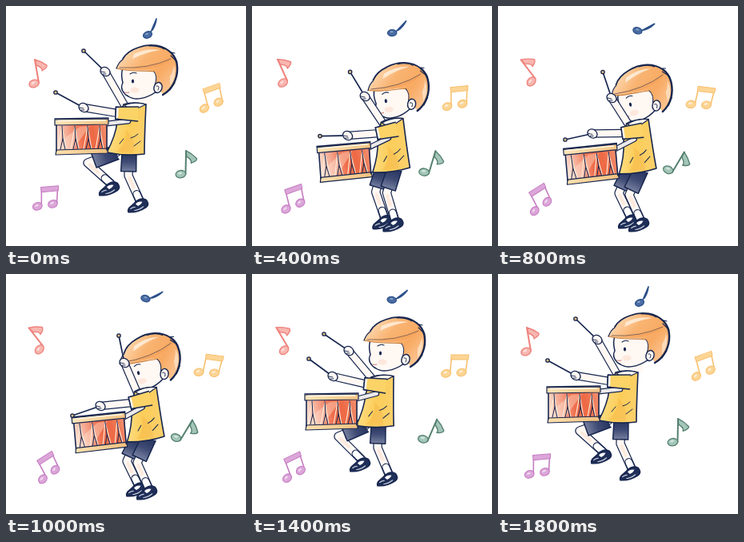
Animation of 300x300 px, one loop 2 s. Source, as an HTML page with a canvas:

```html
<!DOCTYPE html>
<html lang="en">
<head>
<meta charset="utf-8">
<title>Little drummer</title>
<style>
html, body { margin: 0; width: 100%; height: 100%; overflow: hidden; background: #fff; }
canvas { display: block; width: 300px; height: 300px; }
</style>
</head>
<body>
<canvas id="stage"></canvas>
<script>
const canvas = document.getElementById('stage');
const ctx = canvas.getContext('2d');
const dpr = window.devicePixelRatio || 1;
canvas.width = canvas.height = 300 * dpr;

const STEP = 200, LOOP = 2000;
const INK = '#17264f', SKIN = '#fff8f3';

// head, neck and drum: x, y, tilt in degrees; sticks: tip, hand; legs: knee, ankle
const stride = {
  head: [190, 102, 0], neck: [168, 122, 0], drum: [61, 140, 0],
  farStick: [97, 56, 124, 82], nearStick: [62, 108, 97, 127],
  farLeg: [102, 196, 131, 222], nearLeg: [153, 212, 167, 243]
};
const stand = {
  head: [202, 121, 0], neck: [183, 139, -8], drum: [81, 171, -3],
  farStick: [125, 74, 149, 104], nearStick: [85, 171, 122, 174],
  farLeg: [160, 230, 166, 265], nearLeg: [175, 230, 179, 267]
};
const crouch = {
  head: [198, 124, -12], neck: [181, 142, -11], drum: [81, 177, -5],
  farStick: [121, 88, 136, 119], nearStick: [85, 157, 118, 154],
  farLeg: [151, 234, 165, 263], nearLeg: [164, 236, 178, 267]
};
const strike = {
  ...crouch, head: [198, 125, -12], drum: [82, 178, -5],
  farStick: [141, 77, 148, 111], nearStick: [83, 177, 118, 165]
};
const lift = {
  head: [197, 122, -5], neck: [180, 140, -5], drum: [77, 164, 0],
  farStick: [97, 97, 118, 122], nearStick: [82, 119, 121, 129],
  farLeg: [126, 219, 154, 248], nearLeg: [168, 230, 180, 265]
};
const step = {
  head: [192, 107, 0], neck: [170, 127, -2], drum: [66, 149, 0],
  farStick: [90, 75, 121, 96], nearStick: [71, 106, 101, 128],
  farLeg: [108, 203, 137, 232], nearLeg: [157, 217, 171, 250]
};

function mix(a, b, k) {
  const pose = {};
  for (const key in a) pose[key] = a[key].map((v, i) => v + (b[key][i] - v) * k);
  return pose;
}
const poses = [stride, stand, mix(stand, crouch, .6), crouch, mix(crouch, strike, .5),
  strike, lift, step, mix(step, stride, .65), stride];
const sway = [0, .14, .52, .88, .98, 1, .93, .74, .28, 0];

function shape(d, fill, width, ink = INK) {
  const p = new Path2D(d);
  if (fill) { ctx.fillStyle = fill; ctx.fill(p); }
  if (width) { ctx.strokeStyle = ink; ctx.lineWidth = width; ctx.stroke(p); }
}

function oval(x, y, rx, ry, tilt, fill, width, ink = INK) {
  ctx.beginPath();
  ctx.ellipse(x, y, rx, ry, tilt * Math.PI / 180, 0, 7);
  if (fill) { ctx.fillStyle = fill; ctx.fill(); }
  if (width) { ctx.strokeStyle = ink; ctx.lineWidth = width; ctx.stroke(); }
}

function blend(x0, y0, x1, y1, ...colors) {
  const g = ctx.createLinearGradient(x0, y0, x1, y1);
  colors.forEach((c, i) => g.addColorStop(i / (colors.length - 1), c));
  return g;
}

function placed([x, y, tilt], [px, py], draw) {
  ctx.save();
  ctx.translate(x, y);
  ctx.rotate(tilt * Math.PI / 180);
  ctx.translate(-px, -py);
  draw();
  ctx.restore();
}

function line(points, width, color = INK) {
  ctx.beginPath();
  points.forEach(p => ctx.lineTo(p[0], p[1]));
  ctx.lineWidth = width;
  ctx.strokeStyle = color;
  ctx.stroke();
}

function limb(points, width, color) {
  line(points, width + 2.4);
  line(points, width, color);
}

const along = (a, b, k) => [a[0] + (b[0] - a[0]) * k, a[1] + (b[1] - a[1]) * k];

// The two ends of a cut of half-width r across the line a-b, at b.
function across(a, b, r) {
  const angle = Math.atan2(b[1] - a[1], b[0] - a[0]);
  const dx = -Math.sin(angle) * r, dy = Math.cos(angle) * r;
  return [[b[0] - dx, b[1] - dy], [b[0] + dx, b[1] + dy]];
}

// Cloth tube from a to b, open at a.
function tube(a, b, ra, rb, fill) {
  const [a1, a2] = across(b, a, ra), [b1, b2] = across(a, b, rb);
  const edge = [a2, b1, b2, a1];
  ctx.fillStyle = fill;
  ctx.beginPath();
  edge.forEach(p => ctx.lineTo(p[0], p[1]));
  ctx.fill();
  line(edge, 1.5);
}

function onTorso([x, y, tilt], dx, dy) {
  const a = tilt * Math.PI / 180, c = Math.cos(a), s = Math.sin(a);
  return [x + dx * c - dy * s, y + dx * s + dy * c];
}

function stick([tx, ty, hx, hy]) {
  line([[tx, ty], along([tx, ty], [hx, hy], 1.1)], 1.7);
  oval(tx, ty, 2.2, 2.2, 0, '#e3bd7e', 1.3);
}

function hand(x, y) {
  oval(x, y, 6.4, 5.2, 35, SKIN, 1.4);
  line([[x - 5, y], [x, y + 1]], .9);
  line([[x - 3, y + 3], [x + 1, y + 3]], .9);
}

function leg(hip, [kx, ky, ax, ay], cut) {
  const knee = [kx, ky], ankle = [ax, ay];
  limb([hip, knee, ankle], 9, SKIN);
  line([along(knee, ankle, .1), along(knee, ankle, .45)], 4, 'rgba(250,190,160,.25)');
  limb([along(knee, ankle, .75), ankle], 8, '#fff');
  placed([ax - 2, ay + 7, -20], [0, 0], () => {
    shape('M-14 3 C-14 -3 -5 -3 -1 -6 Q7 -9 12 -4 Q15 3 9 5 Q-4 8 -14 3Z', '#1f2f58', 1.6);
    shape('M-2 -3 Q2 -6 7 -3 Q4 0 0 0Z', '#fff');
    shape('M-10 0 Q-6 -1 -4 0 M-6 4 Q1 5 6 3', null, 1.1, '#c9cedc');
  });
  const end = along(hip, knee, cut);
  tube(hip, end, 9, 9.5, blend(hip[0], hip[1], end[0], end[1], '#27345f', '#3f4b74', '#767f9f'));
}

function head() {
  shape('M160 108 L164 124 L180 123 L184 108Z', SKIN);
  shape('M146 78 C143 86 145 91 146 96 C142 103 147 110 153 113 C160 118 174 117 188 107 L193 75Z', SKIN, 1.5);
  oval(161, 105, 5.5, 3.5, 0, 'rgba(250,185,160,.28)');
  oval(158.5, 94, 1.6, 2.5, 0, INK);
  shape('M155 85 Q159 82 163 84', null, 1.1);
  shape('M149 108 Q152 109 154 108', null, .9, '#c76d60');

  shape('M138 78 C143 69 149 59 161 54 C177 46 197 49 207 59 C217 69 215 86 210 96 Q204 107 196 110 L187 99 C186 92 190 88 185 82 C174 78 157 83 138 78Z',
    blend(150, 55, 205, 105, '#fdd8b0', '#f9b472', '#f8aa63', '#fcc694'));
  shape('M144 77 Q178 80 207 66 Q188 84 144 77Z', 'rgba(240,140,65,.28)');
  shape('M160 60 Q176 52 193 55 Q174 58 158 66Z', 'rgba(255,246,232,.75)');
  shape('M205 88 Q209 82 210 74 Q214 88 205 100Z', 'rgba(255,240,222,.6)');
  shape('M138 78 C156 83 174 80 185 82', null, 1.1, '#c9803f');
  shape('M146 67 Q141 70 138 78', null, 1.2);
  shape('M142 77 Q178 79 206 66', null, .8, '#6b5550');
  shape('M146 66 C150 59 156 55 165 52 C181 46 197 49 207 59', null, 1.8);
  shape('M207 59 C217 69 215 86 210 96 Q205 106 196 111', null, 2.4);
  shape('M179 50 Q190 49 198 54 M206 62 L214 70 M207 58 L211 59 M205 105 L211 96', null, 1.1);
  shape('M185 82 Q190 88 186 99', null, 1);

  oval(190, 102, 5, 6.6, 18, SKIN, 1.4);
  shape('M188 100 Q193 99 190 105', null, .9);
}

function shirt() {
  shape('M147 123 Q159 119 175 123 C174 145 173 166 173 185 Q150 188 126 183 Q137 162 139 145Z',
    blend(130, 150, 173, 160, '#fce08c', '#fccd59', '#fbd069'), 1.6);
  shape('M150 155 Q163 166 159 184 L138 182 Q151 172 150 155Z', 'rgba(238,165,60,.25)');
  shape('M148 124 Q155 131 164 128 L175 123 Q160 119 148 124Z', '#fffaf0', 1.2);
  shape('M165 160 Q161 164 156 165 M168 169 L160 175 M147 166 L142 172', null, 1);
}

function drum() {
  shape('M2 6 L66 7 L65 40 L3 41Z', blend(4, 30, 64, 18, '#fbdccd', '#f5a48c', '#ef6f4d', '#ee6a46', '#f18a68'));
  shape('M5 38 L14 24 L31 11 L44 10 L23 39Z', 'rgba(255,232,215,.4)');
  for (const x of [9, 25, 41, 56]) {
    shape(`M${x} 11 L${x - 5} 39 M${x} 11 L${x + 5} 39`, null, 1.1, '#fdeedd');
    shape(`M${x} 10 L${x + 1} 26 L${x + 4} 39 M${x + 1} 26 L${x - 2} 39`, null, 1);
  }
  shape('M0 2 L67 1 L67 8 L0 9Z', blend(0, 0, 67, 0, '#fce4b8', '#f5c585'), 1.2);
  shape('M2 40 L66 38 L66 44 L1 46Z', blend(0, 0, 67, 0, '#fce1b0', '#f2c07d'), 1.2);
  shape('M0 1 L67 0 M2 9 L2 41 M65 9 L65 40', null, 1.6);
  shape('M4 3.5 L63 3', null, 1.3, '#fff8ea');
}

function boy(p) {
  const neck = p.neck;
  const shoulder = onTorso(neck, -3, 13);
  const farHand = p.farStick.slice(2), nearHand = p.nearStick.slice(2);

  leg(onTorso(neck, -30, 61), p.farLeg, .78);
  leg(onTorso(neck, -14, 61), p.nearLeg, .82);
  placed(p.head, [190, 102], head);

  stick(p.farStick);
  limb([onTorso(neck, -17, 7), farHand], 8, SKIN);
  hand(...farHand);
  placed(neck, [168, 122], shirt);

  limb([onTorso(neck, -15, 22), onTorso(p.drum, 65, 7)], 4.5, '#eceaea');
  placed(p.drum, [0, 0], drum);

  const cuff = along(shoulder, nearHand, .41);
  cuff[1] += 2;
  stick(p.nearStick);
  limb([cuff, nearHand], 8, SKIN);
  tube(shoulder, cuff, 9, 7.5, '#fcd367');
  tube(along(cuff, shoulder, .12), cuff, 7.5, 7.5, '#fffaf0');
  hand(...nearHand);
}

function single(color, pale) {
  shape('M5 13 L0 -16', null, 2, color);
  shape('M0 -16 Q8 -14 15 -9 Q16 -6 9 -2 Q10 -6 2 -9Z', pale, 1.4, color);
  oval(-1, 14, 6.3, 4.6, -20, pale, 1.3, color);
  oval(-2, 13, 2.5, 1.3, -25, 'rgba(255,255,255,.55)');
}

function pair(color, pale) {
  shape('M-5 13 L-6 -9 M14 8 L14 -12', null, 1.6, color);
  shape('M-7 -11 L15 -14 L15 -8 L-6 -5Z', pale, 1, color);
  for (const [x, y] of [[-10, 13], [9, 9]]) {
    oval(x, y, 6, 4.7, -22, pale, 1.1, color);
    oval(x - 1, y - 1, 2.5, 1.3, -25, 'rgba(255,255,255,.55)');
  }
}

function notes(s) {
  placed([37, 83 - 2 * s, -28 * s], [1, 0], () => single('#ee827c', '#f8b6b0'));
  placed([224, 197 - s, 11 + 30 * s], [2, 0], () => single('#55806f', '#a3c6b9'));
  placed([256 - s, 113, -12 + 27 * s], [1, 0], () => pair('#f8c070', '#fcd595'));
  placed([51 - s, 237 + 2 * s, 3 - 28 * s], [1, -1], () => pair('#c57dc2', '#dca6d9'));
  placed([182 + 2 * s, 27, 40 * s], [0, 0], () => {
    shape('M-2 8 L6 -11 Q5 -3 1 3', '#3c5f96', 1.7, '#2b4f88');
    oval(-5, 9, 5.7, 4, -22, '#4a6ca3', 1.2, '#2b4f88');
    oval(-6, 8, 2, 1, -25, '#8aa4c7');
  });
}

const start = performance.now();
function render() {
  const k = Math.floor((performance.now() - start) % LOOP / STEP);
  ctx.setTransform(dpr, 0, 0, dpr, 0, 0);
  ctx.fillStyle = '#fff';
  ctx.fillRect(0, 0, 300, 300);
  ctx.lineCap = ctx.lineJoin = 'round';
  notes(sway[k]);
  boy(poses[k]);
  requestAnimationFrame(render);
}
render();
</script>
</body>
</html>
```
